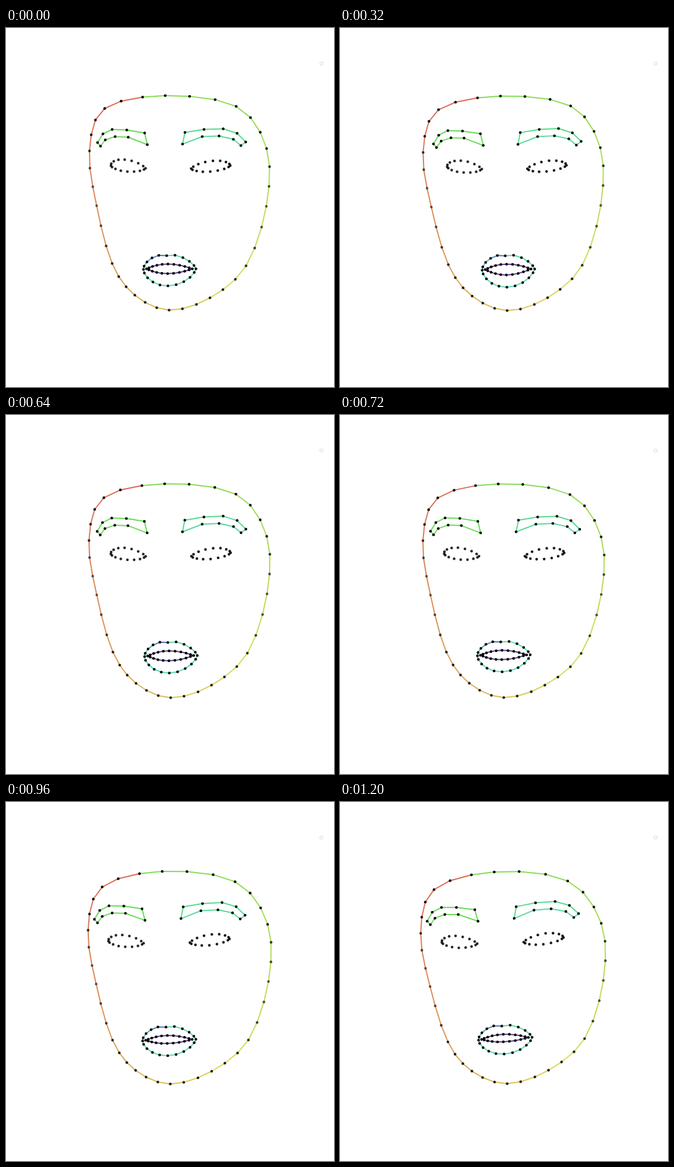
Animation, 550 px wide and 600 px high, one loop 1280 ms. Source, as an HTML page:

```html
<!DOCTYPE html>
<html lang="en">
<head>
<meta charset="utf-8">
<title>Face landmarks</title>
<style>
html, body { margin: 0; width: 100%; height: 100%; overflow: hidden; background: #fff; }
svg { display: block; width: 550px; height: 600px; }
</style>
</head>
<body>
<svg viewBox="0 0 550 600" xmlns="http://www.w3.org/2000/svg">
  <rect x="526.5" y="57" width="5" height="5" rx="1" fill="#fff" stroke="#d6d6d6" stroke-width=".9"/>
  <g id="lines" stroke-width="2" stroke-linecap="round"></g>
  <g id="dots"></g>
</svg>
<script>
const LOOP = 1280, STEP = 80;
const CENTER = [290, 292];

// Head poses: roll in radians, the rest in pixels. Missing values are zero.
const POSES = [
  { t: 0 },
  { t: 320, roll: .013, x: .5, y: .5, yaw: 4, gape: 2 },
  { t: 480, roll: .022, x: .8, y: .5, yaw: 5, gape: 3 },
  { t: 560, roll: .016, x: -4, y: .8, yaw: 3, pitch: .8, gape: 1.7, zoom: .022 },
  { t: 640, roll: .01, x: .6, y: 1.2, yaw: .3, pitch: 1.5, gape: .5 },
  { t: 880, roll: .003, x: .8, y: .8, yaw: -3, pitch: 4.5, gape: -2.5 },
  { t: 1040, roll: .036, x: 2.2, yaw: -2.6, pitch: 7, gape: -3 },
  { t: 1200, roll: .042, x: 2, yaw: -2.4, pitch: 8, gape: -3.5 },
  { t: LOOP }
];

function poseAt(t) {
  const k = POSES.findIndex(p => p.t > t);
  const a = POSES[k - 1], b = POSES[k], f = (t - a.t) / (b.t - a.t);
  const pose = {};
  for (const key of ["roll", "x", "y", "yaw", "pitch", "gape", "zoom"]) {
    pose[key] = (a[key] || 0) * (1 - f) + (b[key] || 0) * f;
  }
  return pose;
}

// Moves a resting point; `depth` says how far yaw and pitch carry it.
function place(p, depth, pose) {
  const dx = p[0] - CENTER[0], dy = p[1] - CENTER[1];
  const [turn, nod] = depth(dx, dy);
  const x = dx * (1 + .0025 * pose.pitch) + pose.roll * dy + pose.yaw * turn;
  const y = dy - pose.roll * dx - pose.pitch * nod;
  return [
    CENTER[0] + x * (1 + pose.zoom) + pose.x,
    CENTER[1] + y * (1 + pose.zoom) + pose.y
  ];
}

const axes = fn => [0, 1].map(fn);
const bell = x => Math.exp(-x * x);

// Closed smooth curve through the key points, `per` samples for each.
function ring(keys, per) {
  const n = keys.length;
  return Array.from({ length: n * per }, (_, i) => {
    const k = Math.floor(i / per), f = i / per - k;
    const [a, b, d, e] = [-1, 0, 1, 2].map(o => keys[(k + o + n) % n]);
    return axes(c => b[c] + f / 2 * (d[c] - a[c] + f * (2 * a[c] - 5 * b[c] + 4 * d[c] - e[c]
      + f * (3 * (b[c] - d[c]) + e[c] - a[c]))));
  });
}

// Two arcs between the corners, n steps each, through a top and a bottom point.
// `even` blends towards equal spacing, `bow` dents the top.
function almond(left, right, top, bottom, n, even = 0, bow = 0) {
  return Array.from({ length: 2 * n }, (_, i) => {
    const a = i / n * Math.PI, cos = Math.cos(a);
    const along = cos + even * (2 * Math.abs(i - n) / n - 1 - cos);
    const bulge = Math.abs(Math.sin(a)) ** 1.3;
    const mid = i <= n ? top : bottom;
    const dent = i <= n ? bow * bell(cos * 5) : 0;
    return axes(c => left[c] + (right[c] - left[c]) * (1 - along) / 2
      + bulge * (mid[c] - (left[c] + right[c]) / 2) + c * dent);
  });
}

const FACE = [[267, 113], [386, 131], [437, 201.5], [436.5, 298], [402.5, 397.5], [342, 451],
  [273.5, 471.5], [216, 446.5], [178, 393.5], [152, 297], [140, 205.5], [165.5, 134.5]];
const BROW = [[153.5, 191.5], [162.5, 177], [178, 169.5], [202.5, 170.5], [232.5, 175.5],
  [237, 195], [205, 182.5], [183, 181.5], [166.5, 187], [158.5, 197.5]];

// The far brow: reflected, wider, and bunched towards the nose.
const reflect = ([x, y]) => {
  const u = (x - 153.5) / 83.5;
  return [402 - 106 * (u + .3 * u * (1 - u)), y - 1];
};

const mouth = (left, right, top, bottom, even, bow) => gape =>
  almond(left, right, [top[0], top[1] - .3 * gape], [bottom[0], bottom[1] + .7 * gape], 10, even, bow);
const still = pts => () => pts;
const flat = (turn, nod) => () => [turn, nod];
const rim = (dx, dy) => {
  const side = (dx / 150) ** 2;
  return [1 - side, -.08 - .75 * side + .0015 * dy];
};

const hsl = (h, s = 65, l = 60) => `hsl(${h} ${s}% ${l}%)`;
const rimColor = i => hsl(7 + 93 * ((35 - i) / 35 || 1) ** 1.2);
const rimFade = i => 1 - .36 * bell((i - 9) / 3) - .44 * bell((i - 27.5) / 3.2) - .15 * bell((i - 18) / 7);
const lipColor = i => i < 5 ? hsl(165 + 16 * i, 48, 55) : hsl(i < 10 ? 155 : 163);

const parts = [
  { shape: still(ring(FACE, 3)), depth: rim, color: rimColor, fade: rimFade },
  { shape: still(BROW), depth: flat(1, -.25), color: i => hsl(i < 5 ? 114 : 110) },
  { shape: still(BROW.map(reflect)), depth: flat(.8, -.1), color: i => hsl(i < 5 ? 144 : 152) },
  { shape: still(almond([176, 230], [234, 234.5], [199, 220], [203.5, 240], 8)),
    depth: flat(1, 0), fade: () => .84 },
  { shape: still(almond([310.5, 235], [376, 230], [347, 222], [342.5, 240], 8)),
    depth: flat(1, 0), fade: () => .9 },
  { shape: mouth([230.5, 403.5], [318.5, 402.5], [269.5, 378], [271.5, 431], 0, 2.5),
    depth: flat(1.5, 1), color: lipColor },
  { shape: mouth([235.5, 402.5], [312.5, 402.5], [271.5, 394.5], [271, 410.5], .5, 0),
    depth: flat(1.5, 1), color: () => hsl(260, 38, 40) }
];

function set(el, attrs) {
  for (const name in attrs) el.setAttribute(name, attrs[name]);
}
function add(parent, tag, attrs) {
  const el = document.createElementNS("http://www.w3.org/2000/svg", tag);
  set(el, attrs);
  return document.getElementById(parent).appendChild(el);
}

for (const part of parts) {
  const { shape, color, fade = () => 1 } = part;
  const pts = shape(0);
  part.lines = color ? pts.map((p, i) => add("lines", "line", { stroke: color(i) })) : [];
  part.dots = pts.map((p, i) => add("dots", "circle", { r: 2.25, "fill-opacity": fade(i) }));
}

function draw(t) {
  const pose = poseAt(t);
  for (const { shape, depth, lines, dots } of parts) {
    const pts = shape(pose.gape).map(p => place(p, depth, pose));
    dots.forEach((dot, i) => set(dot, { cx: pts[i][0], cy: pts[i][1] }));
    lines.forEach((line, i) => {
      const a = pts[i], b = pts[(i + 1) % pts.length];
      set(line, { x1: a[0], y1: a[1], x2: b[0], y2: b[1] });
    });
  }
}

let start;
function tick(ms) {
  start ??= ms;
  draw(Math.floor((ms - start) % LOOP / STEP) * STEP);
  requestAnimationFrame(tick);
}
draw(0);
requestAnimationFrame(tick);
</script>
</body>
</html>
```
